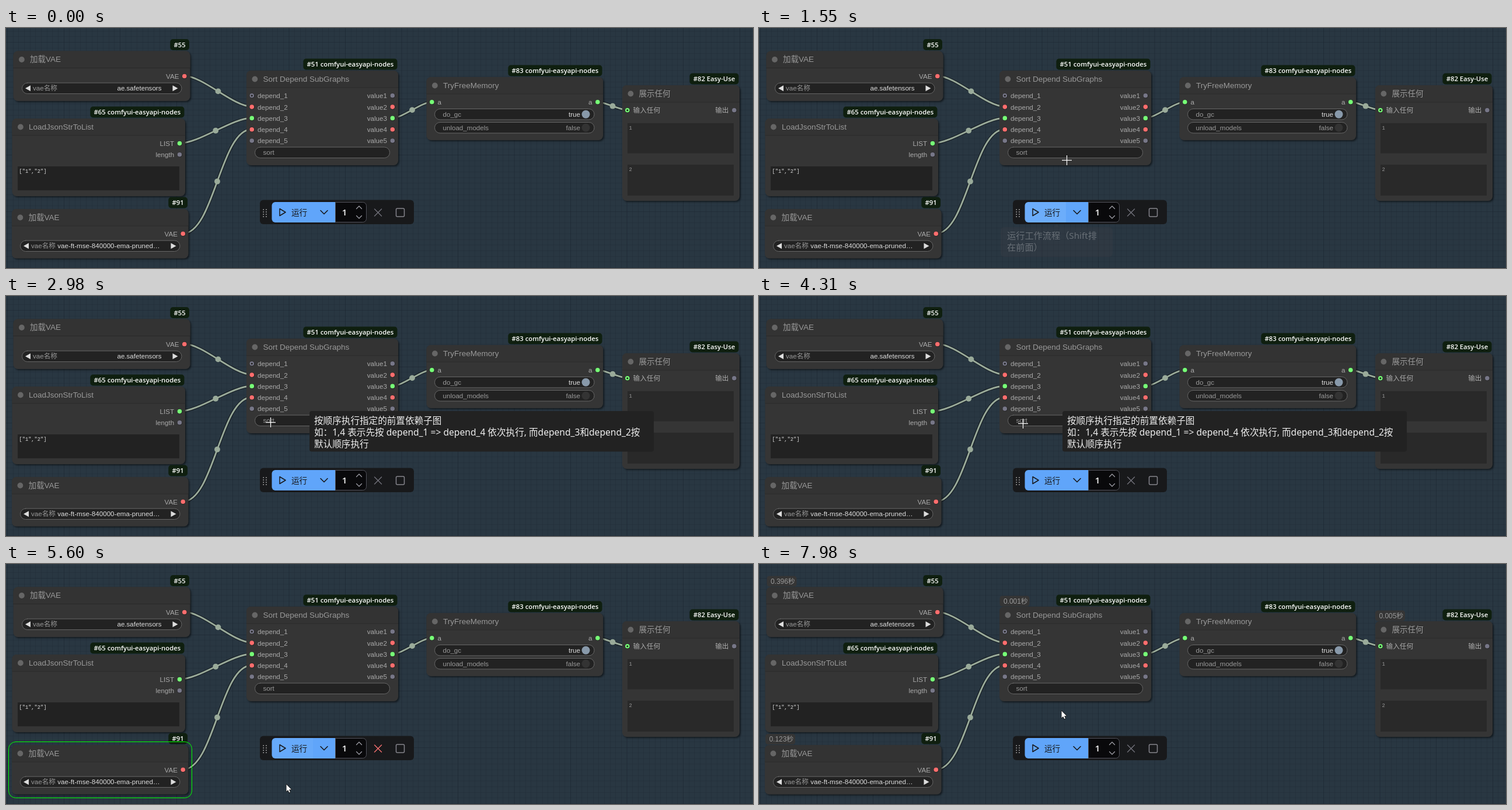
Recreate the animation shown at these times as an HTML page with a canvas. Size 1280 by 411 pixels, loop 8 s.

```html
<!DOCTYPE html>
<html lang="zh-CN">
<head>
<meta charset="utf-8">
<title>Node graph</title>
<style>
html, body { margin: 0; width: 1280px; height: 411px; overflow: hidden; background: #293742; }
canvas { display: block; }
</style>
</head>
<body>
<canvas id="stage" width="1280" height="411"></canvas>
<script>
const ctx = document.getElementById('stage').getContext('2d');
const LOOP = 8000, CELL = 9.65;
const ARIAL = '"Liberation Sans", Arial, "Noto Sans CJK SC", "Noto Sans CJK", sans-serif';
const UI = '"Open Sans", "Noto Sans CJK SC", "Noto Sans CJK", sans-serif';
const TIP = '"Noto Sans", "Noto Sans CJK SC", "Noto Sans CJK", sans-serif';
const MONO = '"Liberation Mono", monospace';
const SMALL = '11.6px ' + ARIAL, TITLE = '13.5px ' + ARIAL;
const RED = '#ff6e6e', GREEN = '#77ff77', GREY = '#777788';

const ramp = (t, a, b) => Math.min(1, Math.max(0, (t - a) / (b - a)));
const within = (t, a, b) => t >= a && t < b;

function text(s, x, y, color = '#aaa', font = SMALL, align = 'left') {
  ctx.font = font;
  ctx.fillStyle = color;
  ctx.textAlign = align;
  ctx.textBaseline = 'alphabetic';
  ctx.fillText(s, x, y);
}

function box(x, y, w, h, r, fill, stroke) {
  ctx.beginPath();
  ctx.roundRect(x, y, w, h, r);
  if (fill) { ctx.fillStyle = fill; ctx.fill(); }
  if (stroke) { ctx.strokeStyle = stroke; ctx.lineWidth = 1; ctx.stroke(); }
}

function disc(x, y, r, fill) {
  ctx.beginPath();
  ctx.arc(x, y, r, 0, 7);
  ctx.fillStyle = fill;
  ctx.fill();
}

function line(points, color, width = 1.4, close = false) {
  ctx.beginPath();
  points.forEach(([x, y]) => ctx.lineTo(x, y));
  if (close) ctx.closePath();
  ctx.strokeStyle = color;
  ctx.lineWidth = width;
  ctx.stroke();
}

function poly(points, fill) {
  ctx.beginPath();
  points.forEach(([x, y]) => ctx.lineTo(x, y));
  ctx.fillStyle = fill;
  ctx.fill();
}

function grid() {
  ctx.fillStyle = '#293742';
  ctx.fillRect(0, 0, 1280, 411);
  const rule = (step, color) => {
    ctx.fillStyle = color;
    for (let x = 2; x < 1280; x += step) ctx.fillRect(Math.round(x), 0, 1, 411);
    for (let y = 24 % step; y < 411; y += step) ctx.fillRect(0, Math.round(y), 1280, 1);
  };
  rule(CELL, 'rgba(20,30,40,.16)');
  rule(CELL * 10, 'rgba(15,24,33,.15)');
}

function link(x1, y1, x2, y2) {
  const c = Math.hypot(x2 - x1, y2 - y1) / 4;
  ctx.beginPath();
  ctx.moveTo(x1, y1);
  ctx.bezierCurveTo(x1 + c, y1, x2 - c, y2, x2, y2);
  ctx.strokeStyle = 'rgba(0,0,0,.45)';
  ctx.lineWidth = 5.2;
  ctx.stroke();
  ctx.strokeStyle = '#9aab9a';
  ctx.lineWidth = 2.9;
  ctx.stroke();
  disc((x1 + x2) / 2, (y1 + y2) / 2, 4.9, '#9aab9a');
}

function node(x, y, w, h, title, badge) {
  ctx.save();
  ctx.shadowColor = 'rgba(0,0,0,.5)';
  ctx.shadowBlur = 3;
  ctx.shadowOffsetX = ctx.shadowOffsetY = 2;
  box(x, y, w, h, 7.7, '#353535');
  ctx.restore();
  box(x, y, w, 29, [7.7, 7.7, 0, 0], '#333');
  ctx.fillStyle = 'rgba(0,0,0,.2)';
  ctx.fillRect(x, y + 28.5, w, 1);
  disc(x + 14.4, y + 14.5, 4.9, '#666');
  text(title, x + 28.5, y + 18.8, '#999', TITLE);
  if (!badge) return;
  const font = '600 11.3px ' + UI;
  ctx.font = font;
  const bw = ctx.measureText(badge).width + 12.5, right = x + w - 1.5;
  box(right - bw, y - 20.5, bw, 19, 4.8, '#0f1f0f');
  text(badge, right - 6.3, y - 7, '#fff', font, 'right');
}

function slot(x, y, color, label, output, ring) {
  disc(x, y, 4.3, 'rgba(0,0,0,.5)');
  disc(x - .2, y - .2, 3.8, color);
  if (ring) disc(x - .2, y - .2, 1.6, '#222');
  text(label, x + (output ? -9.6 : 9.6), y + 4.2, '#aaa', SMALL, output ? 'right' : 'left');
}

function pill(x, y, w, label, value) {
  box(x + .5, y + .5, w, 18.5, 9.25, '#222', '#666');
  if (!value) return text(label, x + 14.5, y + 13.6, '#999');
  const m = y + 9.7;
  poly([[x + 6, m], [x + 15, m - 5], [x + 15, m + 5]], '#ddd');
  poly([[x + w - 6, m], [x + w - 15, m - 5], [x + w - 15, m + 5]], '#ddd');
  text(label, x + 19, y + 13.6, '#999');
  text(value, x + w - 34, y + 13.6, '#ddd', SMALL, 'right');
}

function toggle(y, label, on) {
  pill(734, y, 273.5, label);
  disc(993.5, y + 9.8, 7, on ? '#8899aa' : '#333');
  text(String(on), 984, y + 13.6, on ? '#ddd' : '#999', SMALL, 'right');
}

function area(x, y, w, h, s, fill, color) {
  ctx.fillStyle = fill;
  ctx.fillRect(x, y, w, h);
  text(s, x + 2.5, y + 10.7, color, '8.7px ' + MONO);
}

function graph() {
  grid();
  link(306, 82.3, 421, 134.5);
  link(297.5, 197.5, 421, 154);
  link(303, 352, 421, 173.5);
  link(662, 154, 730, 126.7);
  link(1014, 126.7, 1065, 140.7);

  node(12.5, 39.5, 303, 85.5, '加载VAE', '#55');
  slot(306, 82.7, RED, 'VAE', true);
  pill(27, 93.5, 273.5, 'vae名称', 'ae.safetensors');

  node(10.5, 155, 296.5, 133, 'LoadJsonStrToList', '#65 comfyui-easyapi-nodes');
  slot(297.7, 197.8, GREEN, 'LIST', true);
  slot(297.7, 217, GREY, 'length', true);
  area(20, 237, 277, 41, '["1","2"]', '#222', '#ddd');

  node(10, 310, 302.5, 84.5, '加载VAE', '#91');
  slot(303.5, 352.5, RED, 'VAE', true);
  pill(24, 363.5, 273.5, 'vae名称', 'vae-ft-mse-840000-ema-pruned…');

  node(412, 73, 260, 162, 'Sort Depend SubGraphs', '#51 comfyui-easyapi-nodes');
  [GREY, RED, GREEN, RED, GREY].forEach((color, i) => {
    const y = 116 + i * 19.3;
    slot(421.5, y, color, 'depend_' + (i + 1), false, i === 0);
    slot(662.5, y, color, 'value' + (i + 1), true);
  });
  pill(426, 203.5, 231, 'sort');

  node(720.5, 84, 302.5, 108, 'TryFreeMemory', '#83 comfyui-easyapi-nodes');
  slot(730, 127, GREEN, 'a');
  slot(1014, 127, GREEN, 'a', true);
  toggle(138, 'do_gc', true);
  toggle(161, 'unload_models', false);

  node(1056, 98, 201, 198, '展示任何', '#82 Easy-Use');
  slot(1065, 141, GREEN, '输入任何', false, true);
  slot(1248, 141, GREY, '输出', true);
  area(1065, 163, 182, 51.5, '1', '#292929', '#999');
  area(1065, 234, 182, 53, '2', '#292929', '#999');
}

function timing(x, y, s) {
  box(x, y, 51, 18, 4.5, '#353535');
  text(s, x + 6.5, y + 13.2, '#999', '11.9px ' + ARIAL);
}

function execution(t) {
  if (within(t, 5480, 5640)) box(4.5, 304.5, 314, 96, 12, null, '#0f0');
  if (within(t, 5640, 6050)) box(6.5, 33.5, 315, 97, 12, null, '#0f0');
  if (t >= 5640) timing(11, 291, '0.123秒');
  if (t >= 6050) timing(13.5, 20.5, '0.396秒');
  if (t >= 6090) timing(412.5, 54.5, '0.001秒');
  if (t >= 6130) timing(1056, 79.5, '0.005秒');
}

const lit = k => `rgb(${96 + 51 * k},${165 + 32 * k},${250 + 3 * k})`;

function toolbar(t) {
  const run = ramp(t, 600, 800) - ramp(t, 1430, 1590) + ramp(t, 4990, 5070) - ramp(t, 5460, 5620);
  const menu = ramp(t, 500, 560) - ramp(t, 600, 800);
  const dark = '#18181b', grey = '#71717a';
  box(435, 294.5, 264, 41.5, 6, '#18191b');
  for (let i = 0; i < 8; i++) disc(441.2 + i % 2 * 4.8, 311 + (i >> 1) * 4, .9, '#aaa');
  box(455.5, 298, 70.5, 35, [6, 0, 0, 6], lit(run));
  box(526, 298, 39, 35, 0, lit(menu));
  box(564.5, 298.5, 53, 34, [0, 6, 6, 0], '#09090b', '#52525b');
  ctx.lineCap = ctx.lineJoin = 'round';
  line([[469, 309.5], [479, 315.5], [469, 321.5]], dark, 1.5, true);
  text('运行', 489, 321, dark, '13.6px ' + UI);
  line([[539, 312.5], [545, 318.5], [551, 312.5]], dark, 1.6);
  text('1', 580, 320.5, '#fff', '600 15px ' + UI, 'center');
  line([[600.5, 309.5], [605, 305], [609.5, 309.5]], '#a1a1aa', 1.2);
  line([[600.5, 321.5], [605, 326], [609.5, 321.5]], '#a1a1aa', 1.2);
  const stop = within(t, 5480, 6090) ? '#f87171' : grey;
  line([[631.5, 310], [643.5, 322]], stop);
  line([[643.5, 310], [631.5, 322]], stop);
  ctx.lineWidth = 1.5;
  ctx.beginPath();
  ctx.roundRect(668.5, 309, 14, 14, 2);
  ctx.strokeStyle = '#85858c';
  ctx.stroke();
}

function tooltips(t) {
  if (within(t, 1110, 1590)) {
    ctx.globalAlpha = Math.max(.12, ramp(t, 1170, 1330)) * (1 - ramp(t, 1450, 1590));
    box(414, 341, 192, 51, 6, '#3f3f46');
    poly([[505, 341], [510, 336], [515, 341]], '#3f3f46');
    text('运行工作流程（Shift排', 425, 360.5, '#fff', '15.2px ' + TIP);
    text('在前面）', 425, 380.5, '#fff', '15.2px ' + TIP);
    ctx.globalAlpha = 1;
  }
  if (within(t, 2980, 4350)) {
    box(520, 197, 590, 69.5, 4, '#222');
    [
      '按顺序执行指定的前置依赖子图',
      '如：1,4 表示先按 depend_1 => depend_4 依次执行, 而depend_3和depend_2按',
      '默认顺序执行'
    ].forEach((s, i) => text(s, 528, 218.5 + i * 20, '#eee', '15.6px ' + TIP));
  }
}

// Pointer stops: time, x, y
const PATH = [
  [500, 548, 308], [740, 490, 313], [1390, 490, 313], [1590, 532, 217],
  [1840, 532, 217], [2000, 546, 227], [2460, 454, 217], [4309, 454, 217],
  [4310, 453, 219], [4360, 453, 219], [4860, 490, 313], [5400, 490, 313],
  [5720, 477, 408], [7540, 477, 408], [7720, 452, 336], [7960, 519, 252]
];

function pointerAt(t) {
  const i = PATH.findIndex(p => p[0] > t);
  if (i < 0) return PATH[PATH.length - 1].slice(1);
  const [t0, x0, y0] = PATH[i - 1], [t1, x1, y1] = PATH[i];
  const k = ramp(t, t0, t1), e = k * k * (3 - 2 * k);
  return [Math.round(x0 + (x1 - x0) * e), Math.round(y0 + (y1 - y0) * e)];
}

const HAND = new Path2D('M-1.5 1Q0-1 1.5 1V6.5Q3 5.3 4 7Q5.5 6 6.3 7.7Q8.5 7 8.5 9.5V12Q8 14 6.5 15.5V17.5H-1.5V16L-5 11Q-6 8.5-3.5 9L-1.5 11Z');
const ARROW = new Path2D('M0 0V12L2.7 9.4L4.7 13.8L6.5 13L4.6 8.7H8.5Z');

function pointer(t) {
  if (t < 500) return;
  const [x, y] = pointerAt(t);
  const inside = (l, u, r, d) => x >= l && x <= r && y >= u && y <= d;
  ctx.save();
  ctx.translate(x - .5, y - .5);
  if (inside(412, 73, 672, 235)) {
    ctx.lineCap = 'butt';
    for (const [color, w, r] of [['rgba(0,0,0,.45)', 3, 9], ['#fff', 1.4, 8.5]]) {
      line([[-r, 0], [r, 0]], color, w);
      line([[0, -r], [0, r]], color, w);
    }
  } else {
    const shape = inside(455, 298, 564, 333) ? HAND : ARROW;
    ctx.strokeStyle = '#111';
    ctx.lineWidth = 1.6;
    ctx.stroke(shape);
    ctx.fillStyle = '#fff';
    ctx.fill(shape);
  }
  ctx.restore();
}

const start = performance.now();
function frame() {
  const t = (performance.now() - start) % LOOP;
  graph();
  execution(t);
  toolbar(t);
  tooltips(t);
  pointer(t);
  requestAnimationFrame(frame);
}
frame();
</script>
</body>
</html>
```
